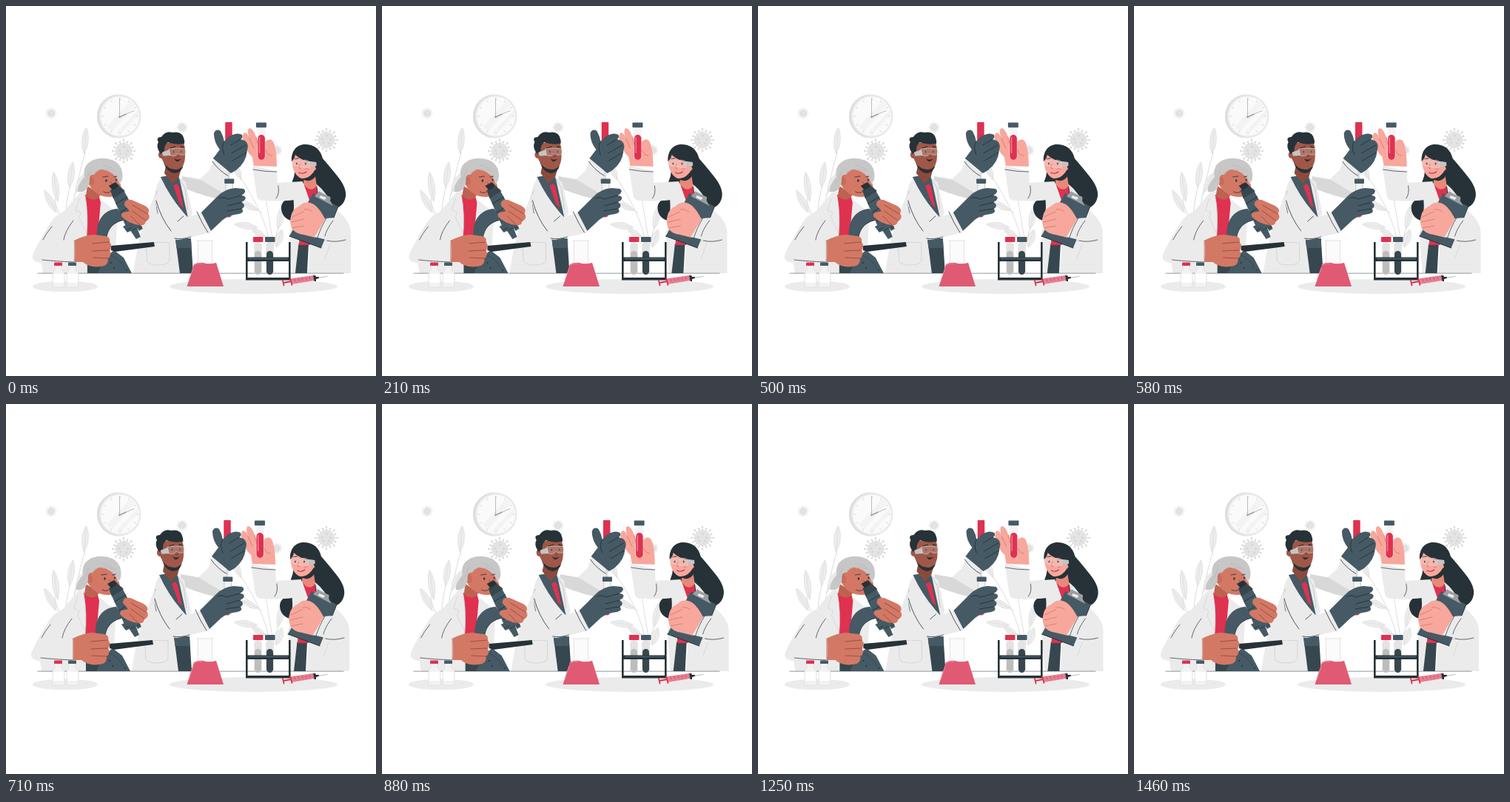
Recreate the animation shown at these times as an HTML page with a canvas. Size 500 by 500 pixels, loop 1.5 s.

```html
<!DOCTYPE html>
<html lang="en">
<head>
<meta charset="utf-8">
<title>Laboratory</title>
<style>
html, body { margin: 0; width: 100%; height: 100%; overflow: hidden; background: #fff; }
canvas { display: block; width: 100vw; height: 100vh; }
</style>
</head>
<body>
<canvas id="stage"></canvas>
<script>
const canvas = document.getElementById('stage');
const ctx = canvas.getContext('2d');
const ratio = window.devicePixelRatio || 1;
canvas.width = canvas.height = 500 * ratio;

const DARK = '#263238', SLATE = '#37474f', GLOVE = '#455a64', RED = '#df3150';
const COAT = '#ebebeb', SHADE = '#d8d8d8', GREY = '#e4e4e4';
const TAN = '#d37865', BROWN = '#a05747', PEACH = '#f8a79d';

function fill(d, color) {
  ctx.fillStyle = color;
  ctx.fill(new Path2D(d));
}
function line(d, color = DARK, width = 0.8) {
  ctx.strokeStyle = color;
  ctx.lineWidth = width;
  ctx.stroke(new Path2D(d));
}
function oval(x, y, rx, ry, color, angle = 0) {
  ctx.fillStyle = color;
  ctx.beginPath();
  ctx.ellipse(x, y, rx, ry, angle, 0, Math.PI * 2);
  ctx.fill();
}
function ring(x, y, r, color, width) {
  ctx.strokeStyle = color;
  ctx.lineWidth = width;
  ctx.beginPath();
  ctx.arc(x, y, r, 0, Math.PI * 2);
  ctx.stroke();
}
function box(x, y, w, h, color, radius = 0) {
  ctx.fillStyle = color;
  ctx.beginPath();
  ctx.roundRect(x, y, w, h, radius);
  ctx.fill();
}

function virus(x, y, r) {
  for (let i = 0; i < 16; i++) {
    const a = i * Math.PI / 8;
    const tip = r * (i % 2 ? 1.25 : 1.42);
    const px = x + Math.cos(a) * tip, py = y + Math.sin(a) * tip;
    line(`M${x} ${y}L${px} ${py}`, '#dadada', r * 0.1);
    oval(px, py, r * 0.13, r * 0.13, '#dadada');
  }
  oval(x, y, r, r, GREY);
  ring(x, y, r, '#d9d9d9', r * 0.08);
  for (let i = 0; i < 5; i++) {
    const a = i * 2.4;
    oval(x + Math.cos(a) * r * 0.55, y + Math.sin(a) * r * 0.55, r * 0.14, r * 0.14, '#d6d6d6');
  }
}

function leaf(x, y, length, width, degrees) {
  ctx.save();
  ctx.translate(x, y);
  ctx.rotate(degrees * Math.PI / 180);
  const h = length / 2;
  const d = `M0 ${h}C${-width} ${h * 0.3} ${-width * 0.6} ${-h * 0.6} 0 ${-h}C${width * 0.6} ${-h * 0.6} ${width} ${h * 0.3} 0 ${h}`;
  fill(d, '#ededed');
  line(d, '#dcdcdc', 0.7);
  line(`M0 ${h}V${-h * 0.8}`, '#d9d9d9', 0.6);
  ctx.restore();
}

function clock() {
  oval(152, 149, 29, 29.5, '#dadada');
  oval(154, 149, 28.5, 29, '#e9e9e9');
  oval(154, 149, 26, 26.5, '#fafafa');
  fill('M136 164L168 128L174 134L144 169Z', '#f3f3f3');
  fill('M149 172L178 141L179 146L154 174Z', '#f3f3f3');
  for (let i = 0; i < 12; i++) {
    const a = i * Math.PI / 6, c = Math.cos(a), s = Math.sin(a);
    line(`M${154 + c * 22} ${149 + s * 22}L${154 + c * 24.5} ${149 + s * 24.5}`, '#cdcdcd', 0.8);
  }
  line('M153.5 150V125', '#b5b5b5', 0.9);
  line('M153.5 150L173 141.5', '#b5b5b5', 0.9);
  line('M153.5 150L162 146.2', '#a4a4a4', 1.6);
  oval(153.5, 150, 1.4, 1.4, '#a4a4a4');
}

function background() {
  oval(80, 379, 44, 7.3, COAT);
  oval(334.5, 379, 113.5, 10, COAT);
  clock();
  virus(61, 145, 4.8);
  virus(159, 196, 10.5);
  virus(238, 164, 4.9);
  virus(366, 195, 4.8);
  virus(433, 181, 10.5);

  line('M88 280Q97 232 107 198M80 285Q82 256 88 240M73 283Q66 268 66 260M92 255Q110 236 117 220', '#dcdcdc', 1);
  leaf(107, 182, 35, 7, 5);
  leaf(88, 228, 35, 7, 8);
  leaf(67, 244, 40, 7, -8);
  leaf(60, 264, 34, 7, -28);
  leaf(101, 238, 28, 7, 28);

  line('M357 325Q352 285 317 232M362 325Q352 270 346 225M355 320Q350 302 325 297M360 325Q365 310 372 285M345 279Q320 258 308 255', '#dedede', 1);
  leaf(311, 220, 32, 7, -25);
  leaf(324, 297, 31, 7, 278);
  leaf(341, 307, 20, 6, -60);
  leaf(369, 314, 25, 8, 18);
  leaf(371, 285, 34, 7, 12);
  leaf(330, 271, 24, 6, -65);
}

function microscope() {
  fill('M124 361Q133 340 146 330L159 340L170 361Z', GLOVE);
  line('M140 336Q154 341 160 354', SLATE, 0.9);
  oval(142, 347, 1, 1, DARK);
  oval(146, 354, 1, 1, DARK);
  oval(163, 357, 1, 1, DARK);
  fill('M151 274C132 275 121 290 123 314L136 323C134 304 143 292 161 289Z', GLOVE);
  line('M136 323C134 304 143 292 160 289', DARK, 0.9);
  fill('M142 324L200 319L201 325L148 332L142 330Z', DARK);
  fill('M158 298L166 294L171 303L164 306ZM164 297L175 294L182 312L176 315ZM174 294L180 291L185 301L180 304Z', GLOVE);
  line('M163 303L169 300M171 303L177 300M179 300L184 298', DARK, 0.8);
  fill('M144 257L158 247L182 291L163 300Z', GLOVE);
  fill('M141 249L153 243L161 250L145 260Z', SLATE);
  fill('M139 243L148 238L153 243L144 249Z', DARK);
  line('M149 267L164 258M155 279L169 270M161 291L176 282', DARK, 1);
}

function olderScientist() {
  fill('M50 361L48 347Q35 346 36 338Q39 327 60 293Q66 283 79 277L100 252L112 250L128 261L151 280L146 361Z', COAT);
  fill('M107 255L126 258L128 266L124 311L109 313Q112 280 107 255Z', RED);
  fill('M110 243L128 255Q121 267 108 257Z', '#bd6250');
  fill('M110 350H150V361H110Z', SLATE);
  line('M107 256Q112 285 109 312', '#c9c9c9', 0.7);
  line('M99 260L94 276L101 279L99 286L109 307', '#d0d0d0', 0.7);
  line('M91 290Q80 304 78 316M49 343Q66 345 92 346M62 298Q54 308 50 316', DARK, 0.7);

  fill('M112 232Q114 222 126 220L147 224Q154 235 156 246Q153 255 142 258Q122 259 112 241Z', TAN);
  oval(115, 236, 4, 6, '#c96b58', -0.3);
  fill('M97 251Q96 242 106 231Q103 215 118 208Q132 203 146 209Q160 217 157 235L153 241Q151 229 138 223Q128 216 119 228Q112 226 113 238Q110 253 98 251Z', '#c7c7c7');
  line('M119 225Q130 216 146 223M105 240Q111 232 114 221M131 215Q144 217 150 225', '#b4b4b4', 0.6);
  oval(135.5, 236, 1.2, 1.7, DARK);
  oval(149, 235, 1, 1.5, DARK);
  line('M131 231L138 230M146 231L150 230', SLATE, 1.2);
  line('M142 238Q147 243 142 245', '#8f3f31', 0.8);
  line('M132 251Q137 254 141 251', DARK, 0.8);

  microscope();
  fill('M160 269Q160 260 170 262L188 270Q196 275 192 280Q197 287 189 291Q188 298 180 296Q165 294 156 284Q155 278 164 278L167 277Z', TAN);
  line('M171 269L191 281M171 277L189 290M169 284L181 296', '#7c4238', 0.7);
  fill('M92 317Q108 309 119 309L135 311Q142 313 140 319Q145 325 140 330Q144 337 138 341Q139 351 128 352Q113 354 104 346L92 346Z', TAN);
  line('M117 321L140 319M117 331L140 330M118 340L138 341', '#7c4238', 0.7);
  line('M92 317Q94 330 92 346', '#c8c8c8', 0.8);
}

function goggles(x, y, angle) {
  ctx.save();
  ctx.translate(x, y);
  ctx.rotate(angle);
  const lens = 'M-7 -5Q2 -6 14 -4Q17 0 14 4Q8 6 4 2Q0 7 -6 4Z';
  fill('M-17 -1L-7 -4L-6 4L-16 4Z', '#c4c4c4');
  fill(lens, 'rgba(235,235,235,.22)');
  line(lens, 'rgba(225,225,225,.75)', 0.7);
  ctx.restore();
}

function tubeAndPipette() {
  box(296.3, 157, 9.5, 29, RED, 1);
  box(299, 180, 4, 42, '#d5d5d5');
  line('M301 205V236', '#cfd8dc', 2);
}

function tallScientist() {
  fill('M238 230L272 236L321 259L308 265Q270 259 238 245Z', SHADE);
  fill('M281 207L303 226L302 235Q300 240 307 261Q283 247 262 234L275 222Z', COAT);
  line('M279 210Q287 222 301 230', DARK, 0.8);
  fill('M212 230Q204 238 202 252L187 292Q177 323 172 361H235L231 313L252 280L243 238L232 230Z', COAT);
  fill('M229 314H250L253 361H235Z', SLATE);
  fill('M229 314H250L250.5 327H230.5Z', GLOVE);
  line('M190 321Q206 318 221 320V344Q219 350 206 350Q193 350 191 345Z', '#d0d0d0', 0.8);
  fill('M209 231L233 227L246 286L239 278Q221 257 209 231Z', GLOVE);
  fill('M226 243L231 240L234 244L240 273L235 268L228 248Z', RED);
  line('M233 231L242 246L246 275', '#bababa', 0.7);
  line('M204 251Q201 262 205 280', DARK, 0.6);

  fill('M217 211L238 216L234 230L225 240L214 226Z', '#8c4a3c');
  fill('M209 188L237 179Q244 190 242 204Q242 218 231 221Q217 222 210 205Z', BROWN);
  fill('M213 210Q218 222 231 221Q237 220 240 214Q238 225 228 226Q216 224 213 210Z', DARK);
  oval(210, 201, 4, 5, BROWN);
  fill('M209 200Q202 190 206 184Q202 177 210 177Q216 168 225 171Q239 168 241 181Q242 187 240 186Q228 188 219 184Q214 187 214 196Z', DARK);
  line('M222 192L229 190M236 190L240 191', DARK, 1.3);
  oval(226.5, 197, 1.1, 1.5, DARK);
  oval(237, 197, 1, 1.4, DARK);
  line('M232 197Q237 203 232 204', '#713126', 0.8);
  fill('M227 206Q233 209 237 206Q234 211 230 210Z', DARK);
  goggles(228, 197.5, -0.08);

  tubeAndPipette();
  fill('M280 206L289 194Q281 184 281 172Q284 165 290 169Q294 176 295 183L302 176Q313 170 319 174Q321 178 317 180L323 182Q329 187 326 195Q325 211 311 222L304 226Z', GLOVE);
  line('M317 180L304 188M324 188L305 199M325 198L306 209M295 183Q290 191 295 201', DARK, 0.9);

  fill('M204 251Q200 260 204 272Q209 292 221 311Q226 318 239 315L277 306L267 279L245 285Q234 279 222 256Z', COAT);
  line('M203 263Q209 286 223 304M228 314Q238 316 250 312M258 278Q265 294 273 306M240 284L232 291', DARK, 0.8);
  box(296.5, 239, 10.5, 14, '#f4f4f4');
  line('M297 240V252M306.5 240V252', '#aebabd', 0.7);
  box(295.3, 233.5, 13, 6.5, GLOVE, 1);
  oval(301, 282, 4, 3.5, RED);
  fill('M264 279L286 257Q296 247 310 246L321 247Q327 251 318 256Q327 257 322 263L318 265Q326 269 319 274Q323 279 315 281Q302 282 293 289L277 304Z', GLOVE);
  line('M318 256L300 261M319 265L300 270M318 274L299 277M288 260Q294 257 300 261', DARK, 0.9);
}

function clipboard() {
  fill('M415 253L449 271L426 327L383 311Z', GLOVE);
  fill('M417 257L422 252Q423 249 426 252L436 257Q440 257 438 263L442 270Z', '#9a9fa1');
  fill('M425 256L433 259L431 262L424 259Z', '#eeeeee');
  line('M449 271L441 291M426 327L383 311', DARK, 1);
}

function youngScientist() {
  fill('M387 237Q393 224 388 210Q385 190 402 187Q423 186 428 206Q436 215 448 230Q461 246 459 258Q456 273 440 274Q410 276 389 291Q373 288 372 273Q372 262 386 259Z', DARK);

  fill('M391 321L409 322L407 361H390Z', SLATE);
  fill('M401 240L419 237L421 259L414 323H396Z', RED);
  fill('M403 227L417 223L420 243Q411 254 402 240Z', '#e78879');

  fill('M333 216L366 223L367 239L401 237L403 260Q376 265 350 263Q340 264 339 256Z', COAT);
  line('M334 221Q350 224 366 224M368 243Q370 254 365 260', DARK, 0.7);
  fill('M402 239L388 250L389 267Q390 279 383 308L387 361H391L397 308L410 262Z', COAT);
  fill('M420 241Q434 252 442 272Q465 288 466 305L466 361H408L411 320L424 270Z', COAT);
  line('M419 241L425 254L423 265M430 318Q444 314 456 318M438 322L431 341', '#d0d0d0', 0.7);

  fill('M386 204Q387 199 396 199L414 198Q420 209 418 224Q412 236 402 234Q390 231 387 215Z', PEACH);
  fill('M398 233Q410 235 418 221L419 229Q412 241 398 233Z', DARK);
  oval(418, 216, 4, 5, PEACH);
  fill('M386 210Q385 192 400 188Q419 187 425 207Q428 217 421 226L416 211Q400 210 391 201Q390 207 386 210Z', DARK);
  line('M390 207L395 206M403 207L408 208', DARK, 1.1);
  oval(393, 213, 1, 1.5, DARK);
  oval(405, 213, 1.1, 1.5, DARK);
  line('M398 213Q394 219 398 220', '#c6604f', 0.8);
  line('M396 225Q401 228 406 224', '#ad3445', 1.1);
  oval(407, 220, 2.8, 1.8, 'rgba(232,90,90,.3)');
  goggles(403, 213, Math.PI + 0.12);

  clipboard();
  fill('M385 285Q386 275 397 270Q404 263 414 267Q421 270 428 282L432 289L418 313L402 309Q389 307 386 299Q383 292 385 285Z', PEACH);
  line('M387 285L402 278M386 292L403 288M387 300L403 297M403 275Q410 274 414 278', '#c97060', 0.7);
  fill('M432 287Q446 285 457 288Q467 296 464 311Q456 321 442 318L417 312Z', COAT);
  line('M433 287Q426 298 421 313M442 290Q433 302 431 311M434 317Q445 320 459 316', DARK, 0.7);

  fill('M335 216L333 204Q324 196 320 181Q319 172 323 171Q327 172 329 179Q325 167 329 165Q334 165 338 177L342 186L350 184Q357 177 361 183Q366 193 366 217Z', PEACH);
  box(339.7, 164, 11, 44, 'rgba(240,240,240,.75)', 5);
  box(340.5, 174, 9.5, 34, RED, 5);
  box(342, 177, 1.4, 22, '#f08398', 1);
  box(338, 157.5, 14, 6.7, GLOVE, 1);
  line('M329 179L335 192M338 177L341 190M351 195Q353 202 359 202', '#c97060', 0.7);
}

function vial(x, capColor) {
  box(x + 2, 346.5, 11, 5, capColor, 1);
  fill(`M${x + 3} 351H${x + 12}V357Q${x + 16} 358 ${x + 16} 362V380H${x}V362Q${x} 358 ${x + 3} 357Z`, '#f2f2f2');
  line(`M${x + 3} 351V357Q${x} 358 ${x} 362V380H${x + 16}V362Q${x + 16} 358 ${x + 12} 357V351`, '#dadada', 0.6);
  box(x + 1, 362, 14, 12, '#fff');
}

function tube(x, capColor, liquid) {
  box(x + 1.3, 319, 10.5, 44, '#e3e3e3', 5);
  box(x + 2, 331, 9, 32, liquid, 4.5);
  box(x, 312, 13.5, 7, capColor, 1);
}

function tableware() {
  vial(63, RED);
  vial(82, GLOVE);

  fill('M259 317H279V345L293 379H245L259 345Z', 'rgba(250,250,250,.8)');
  line('M258 317H280M259.5 317V345L254 356M278.5 317V345', '#dcdcdc', 0.8);
  fill('M254 349Q262 345 270 348Q277 349 284 347L294 379H244.5Z', '#e05a73');
  line('M254 350Q259 347 265 348M253 354L247 372', '#ec93a4', 0.9);

  tube(334, RED, '#bdbdbd');
  tube(350, GLOVE, SLATE);
  box(324, 319, 2.6, 51, DARK);
  box(382, 319, 2.6, 51, DARK);
  box(324, 367, 60.6, 3.6, DARK);
  box(326, 339.5, 57, 5.5, DARK);
  box(328, 340.5, 53, 2, GLOVE);

  line('M374 371L375.5 377.5M375 374L386 372', RED, 1.8);
  fill('M384 368.5L415 364L416.5 371L386 376Z', '#e77e91');
  line('M384 368L386.5 377', RED, 1.8);
  line('M390 369L391 372M395 368L396 371M400 367.5L401 370.5M405 367L406 370M410 366L411 369', '#b73b51', 0.6);
  fill('M415 364L418 364L419 366L423 366L423 368L419 369L419 372L416.5 372Z', DARK);
  line('M422 367.2L434 365.5', '#90a4ae', 0.7);
}

// Shake keyframes, one value per tenth of the loop, scaled to stage pixels.
const LOOP = 1500, FRAME = LOOP / 36;
const SHAKE = [0, -1, 2, -4, 4, -4, 4, -4, 2, -1, 0];

function shakeAt(ms) {
  const step = Math.floor((ms + 5) / FRAME) % 36;
  const pos = (step + 0.5) / 36 * 10;
  const i = Math.floor(pos);
  return 0.7 * (SHAKE[i] + (SHAKE[i + 1] - SHAKE[i]) * (pos - i));
}

function draw(ms) {
  ctx.setTransform(ratio, 0, 0, ratio, 0, 0);
  ctx.lineCap = ctx.lineJoin = 'round';
  ctx.fillStyle = '#fff';
  ctx.fillRect(0, 0, 500, 500);
  background();
  ctx.save();
  ctx.translate(shakeAt(ms % LOOP), 0);
  youngScientist();
  tallScientist();
  olderScientist();
  ctx.restore();
  line('M43 361.2H456', DARK, 0.5);
  tableware();
}

const start = performance.now();
function tick() {
  draw(performance.now() - start);
  requestAnimationFrame(tick);
}
tick();
</script>
</body>
</html>
```
